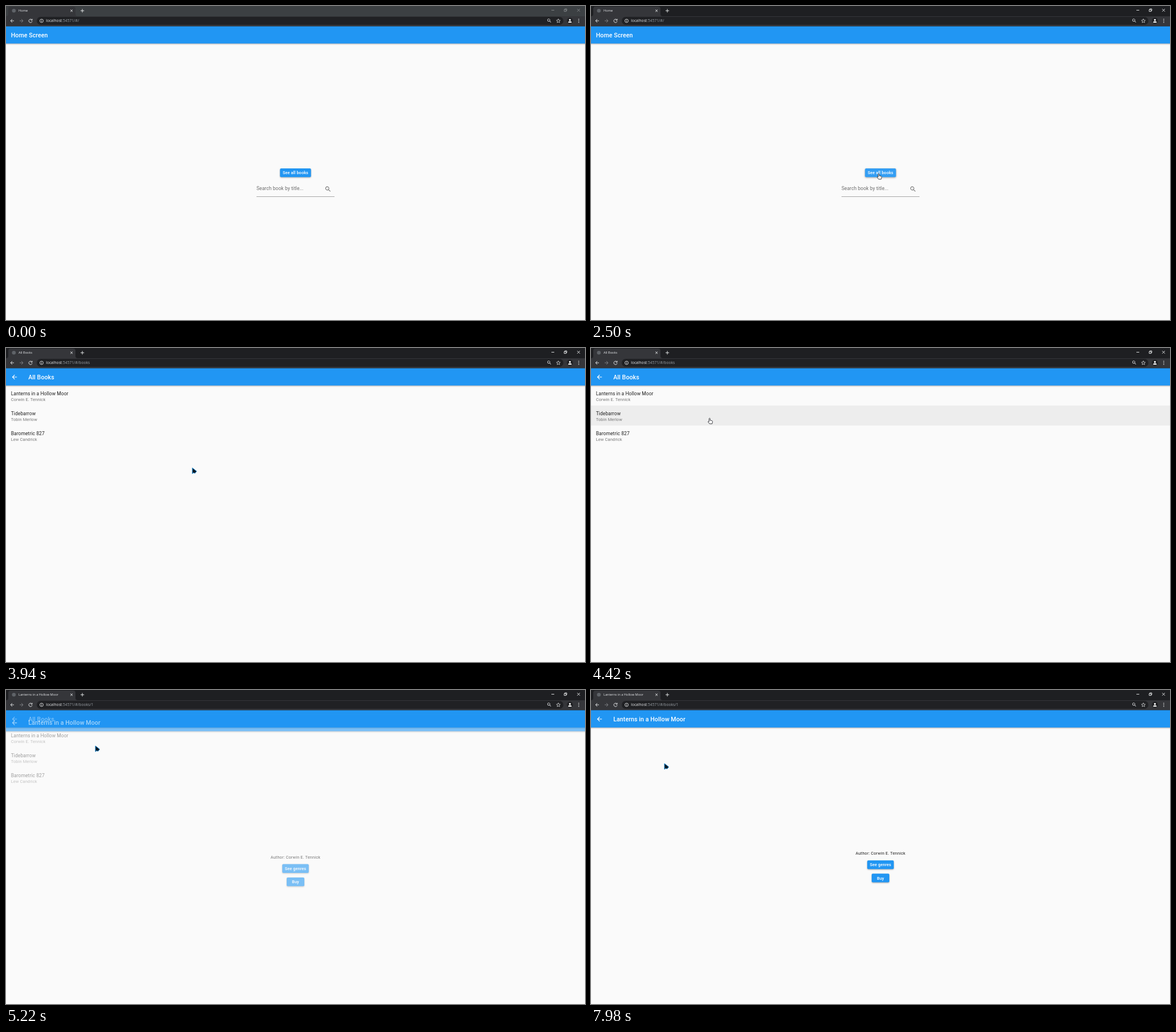
Recreate the animation shown at these times as an HTML page. Size 1017x551 px, loop 8000 ms.

```html
<!DOCTYPE html>
<html lang="en">
<head>
<meta charset="utf-8">
<title>Book browser</title>
<style>
html, body { margin: 0; width: 100%; height: 100%; overflow: hidden; background: #fafafa; }
svg { display: block; width: 100vw; height: 100vh; }
text { font-family: Roboto, sans-serif; white-space: pre; }
.chrome text { font: 5.7px "Open Sans", sans-serif; fill: #e8eaed; }
.chrome #url { font-size: 6.7px; }
.line { fill: none; stroke: #f1f3f4; stroke-width: .9; }
.title { font-size: 10.6px; font-weight: 500; letter-spacing: .08px; fill: #fff; }
.item { font-size: 8.48px; letter-spacing: .08px; fill: #212121; }
.sub { font-size: 7.42px; letter-spacing: .13px; fill: #757575; }
.label { font-size: 7.42px; font-weight: 500; letter-spacing: .06px; fill: #fff; text-anchor: middle; }
.bar, .button { filter: drop-shadow(0 1px 1px rgba(0,0,0,.32)); }
</style>
</head>
<body>
<svg id="stage" viewBox="0 0 1017 551" preserveAspectRatio="none"></svg>
<script>
const BLUE = '#2196f3';
const LIST_START = 3084, BOOK_START = 5004, FADE = 300, FOCUS = 500;
const BOOK = 'Lanterns in a Hollow Moor', AUTHOR = 'Corwin E. Tennick';
const BOOKS = [[BOOK, AUTHOR], ['Tidebarrow', 'Tobin Merlow'], ['Barometric 827', 'Lew Candrick']];

// Pointer path: time, x, y of the tip
const PATH = [
  [440, 300, 300], [760, 376, 384], [860, 376, 384], [1120, 60, 22], [1300, 9, 8],
  [1640, 8, 60], [1960, 300, 378], [2240, 566, 322], [2440, 505, 294], [3500, 505, 294],
  [3900, 330, 210], [4120, 300, 214], [4420, 208, 123], [4840, 157, 98], [5380, 157, 98],
  [5790, 110, 28], [6000, 60, 24], [6240, 26, 9], [6440, 70, 15], [6640, 100, 9],
  [6900, 28, 9], [7200, 118, 12], [7420, 52, 9], [7480, 52, 9], [7980, 129, 129]
];

const text = (cls, x, y, s) => `<text class="${cls}" x="${x}" y="${y}">${s}</text>`;
const line = (d, extra = '') => `<path class="line" d="${d}" ${extra}/>`;
const rect = (x, y, w, h, fill, extra = '') =>
  `<rect x="${x}" y="${y}" width="${w}" height="${h}" fill="${fill}" ${extra}/>`;
const button = (x, y, w, s, id = '') =>
  rect(x, y, w, 15.3, BLUE, `rx="2" class="button" id="${id}"`) + text('label', x + w / 2, y + 10.4, s);
const magnifier = (x, y, scale, fill) =>
  `<path transform="translate(${x} ${y}) scale(${scale})" fill="${fill}" d="M15.5 14h-.8l-.3-.3A6.5 6.5 0 1 0 13.7 14.4l.3.3v.8l5 5L20.5 19zM9.5 14a4.5 4.5 0 1 1 0-9 4.5 4.5 0 0 1 0 9z"/>`;
const backArrow = (x, y, s) => `M${x + s} ${y}H${x - s}m${s} ${-s}l${-s} ${s}l${s} ${s}`;

function page(id, title, back, body) {
  return `<g id="${id}">${rect(0, 36, 1017, 515, '#fafafa')}${body}
    ${rect(-5, 35.5, 1027, 30.3, BLUE, 'class="bar"')}
    ${back ? line(backArrow(15.3, 51, 3.9), 'style="stroke:#fff;stroke-width:1.1"') : ''}
    ${text('title', back ? 39.2 : 8.7, 54.8, title)}</g>`;
}

const home = page('home', 'Home Screen', false,
  button(481.3, 285, 54.4, 'See all books', 'all') +
  `<text class="item" x="440" y="323.2" style="fill:#6d6d6d">Search book by title...</text>` +
  magnifier(559.3, 315, .53, '#757575') + rect(440, 334, 137, .7, '#858585'));

const list = page('list', 'All Books', true,
  rect(0, 66, 1017, 35, '#000', 'id="row" fill-opacity=".05"') +
  BOOKS.map(([name, author], i) =>
    text('item', 8.7, 83 + 35 * i, name) + text('sub', 8.7, 92.6 + 35 * i, author)).join(''));

const book = page('book', BOOK, true,
  `<text class="sub" x="508.4" y="289" text-anchor="middle" style="fill:#212121">Author: ${AUTHOR}</text>` +
  button(485.2, 299, 46.6, 'See genres') + button(493, 322.3, 31, 'Buy'));

const chrome = `<g class="chrome">
  ${rect(0, 0, 1017, 36, '#202124', 'id="strip"')}
  ${rect(0, 18, 1017, 17.8, '#35363a')}
  <path fill="#35363a" d="M0 18Q4 18 4 14V5Q4 1 8 1H118Q122 1 122 5V14Q122 18 126 18z"/>
  <circle cx="13.8" cy="8.3" r="3.3" fill="#5f6368"/>
  <text id="tab" x="22" y="10.4"></text>
  ${line('M113.2 6.4l3.8 3.8m0-3.8l-3.8 3.8M131 8.3h6.2m-3.1-3.1v6.2')}
  ${line('M958 7.4h5M980.4 6.2h3.4v3.4h-3.4zM981.6 6.2v-1.2h3.4v3.4h-1.2M1003.3 5l4.8 4.8m0-4.8l-4.8 4.8', 'id="win"')}
  ${line(backArrow(11, 26, 2.9))}
  ${line('M24 26h6m-3-3l3 3l-3 3', 'style="stroke:#85878b"')}
  ${line('M45.4 24.2A3 3 0 1 0 46 26.8M46 22.6v2.4h-2.5')}
  ${rect(54, 19, 925, 14, '#202124', 'rx="7" id="pill"')}
  ${line('M62.5 25.6v2.2m0-3.8v.8M59.5 26a3 3 0 1 0 6 0a3 3 0 1 0-6 0', 'style="stroke-width:.8"')}
  <text id="url" x="70.2" y="28.2">localhost<tspan id="tail" fill="#9aa0a6"></tspan></text>
  ${magnifier(949.7, 21.2, .38, '#e8eaed')}
  ${line('M970.2 22.6l1 2.3l2.4.2l-1.8 1.7l.5 2.4l-2.1-1.3l-2.1 1.3l.5-2.4l-1.8-1.7l2.4-.2z', 'style="stroke-width:.7"')}
  <circle cx="990.5" cy="26" r="5.4" fill="#202124"/>
  <circle cx="990.5" cy="24.4" r="1.6" fill="#fff"/>
  <path fill="#fff" d="M987.4 29.2q0-2.4 3.1-2.4t3.1 2.4z"/>
  ${[23.2, 26, 28.8].map(y => `<circle cx="1006" cy="${y}" r=".8" fill="#f1f3f4"/>`).join('')}
</g>`;

const pointer = `<g id="pointer">
  <path id="arrow" d="M0 0V10.2L2.5 8.4L4.4 9.6L7.6 6z" fill="#0b1822" stroke="#1b87d2" stroke-width="1"/>
  <path id="hand" d="M-.6 .8Q.4-.8 1.3.8V4L4.6 4.6Q5.8 5 5.5 6.7L4.7 10H.3L-2.6 6.4Q-2.3 5.2-.6 6.2z" fill="#fff" stroke="#27292e" stroke-width=".9"/>
  <path id="beam" d="M-1.5-4.5h3M0-4.5v9M-1.5 4.5h3" fill="none" stroke="#8a8d91" stroke-width=".8"/>
</g>`;

const $ = id => document.getElementById(id);
$('stage').innerHTML = `<clipPath id="view"><rect y="35.5" width="1017" height="516"/></clipPath>
  ${chrome}<g clip-path="url(#view)">${home}${list}${book}</g>${pointer}`;

const show = (id, on) => { $(id).style.display = on ? '' : 'none'; };
const clamp = v => Math.min(1, Math.max(0, v));

function bezier(x1, y1, x2, y2, x) {
  const at = (a, b, u) => 3 * a * u * (1 - u) ** 2 + 3 * b * u * u * (1 - u) + u ** 3;
  let lo = 0, hi = 1;
  for (let i = 0; i < 24; i++) {
    const mid = (lo + hi) / 2;
    if (at(x1, x2, mid) < x) lo = mid; else hi = mid;
  }
  return at(y1, y2, lo);
}

// A new page fades in while rising from a quarter of its height
function enter(id, t, start) {
  const p = clamp((t - start) / FADE);
  show(id, p > 0);
  $(id).setAttribute('opacity', p < 1 ? bezier(.42, 0, 1, 1, p) : 1);
  $(id).setAttribute('transform', `translate(0 ${129 * (1 - bezier(.4, 0, .2, 1, p))})`);
}

function pointerAt(t) {
  const i = Math.max(1, PATH.findIndex(k => k[0] >= t));
  if (t >= PATH[PATH.length - 1][0]) return PATH[PATH.length - 1].slice(1);
  const [t0, x0, y0] = PATH[i - 1], [t1, x1, y1] = PATH[i];
  const p = clamp((t - t0) / (t1 - t0)), e = p * p * (3 - 2 * p);
  return [x0 + (x1 - x0) * e, y0 + (y1 - y0) * e];
}

function draw(t) {
  const onList = t >= LIST_START, onBook = t >= BOOK_START;
  enter('list', t, LIST_START);
  enter('book', t, BOOK_START);
  $('tab').textContent = onBook ? BOOK : onList ? 'All Books' : 'Home';
  $('tail').textContent = ':54571/#/' + (onBook ? 'books/1' : onList ? 'books' : '');

  const focused = t >= FOCUS;
  $('strip').setAttribute('fill', focused ? '#1e1f22' : '#3c4043');
  $('win').style.stroke = focused ? '#f1f3f4' : '#85888c';

  const [x, y] = pointerAt(t);
  const within = (l, top, r, b) => t >= PATH[0][0] && x > l && x < r && y > top && y < b;
  const onButton = !onList && within(481, 285, 536, 301);
  const onRow = t >= LIST_START + FADE && !onBook && within(0, 66, 1017, 171);
  const onPill = within(54, 19, 979, 33);
  const onField = !onList && within(440, 308, 556, 335);
  $('all').setAttribute('fill', onButton || onList ? '#339ef4' : BLUE);
  $('all').style.filter = onButton ? 'drop-shadow(0 1.5px 1.5px rgba(0,0,0,.36))' : '';
  show('row', onRow);
  $('row').setAttribute('y', 66 + 35 * Math.floor((y - 66) / 35));
  $('pill').setAttribute('fill', onPill ? '#2b2c30' : '#202124');

  show('pointer', t >= PATH[0][0]);
  $('pointer').setAttribute('transform', `translate(${x} ${y})`);
  const hand = onButton || onRow, beam = onPill || onField;
  show('hand', hand);
  show('beam', beam);
  show('arrow', !hand && !beam);
}

function tick() {
  draw(performance.now() % 8000);
  requestAnimationFrame(tick);
}
tick();
</script>
</body>
</html>
```
